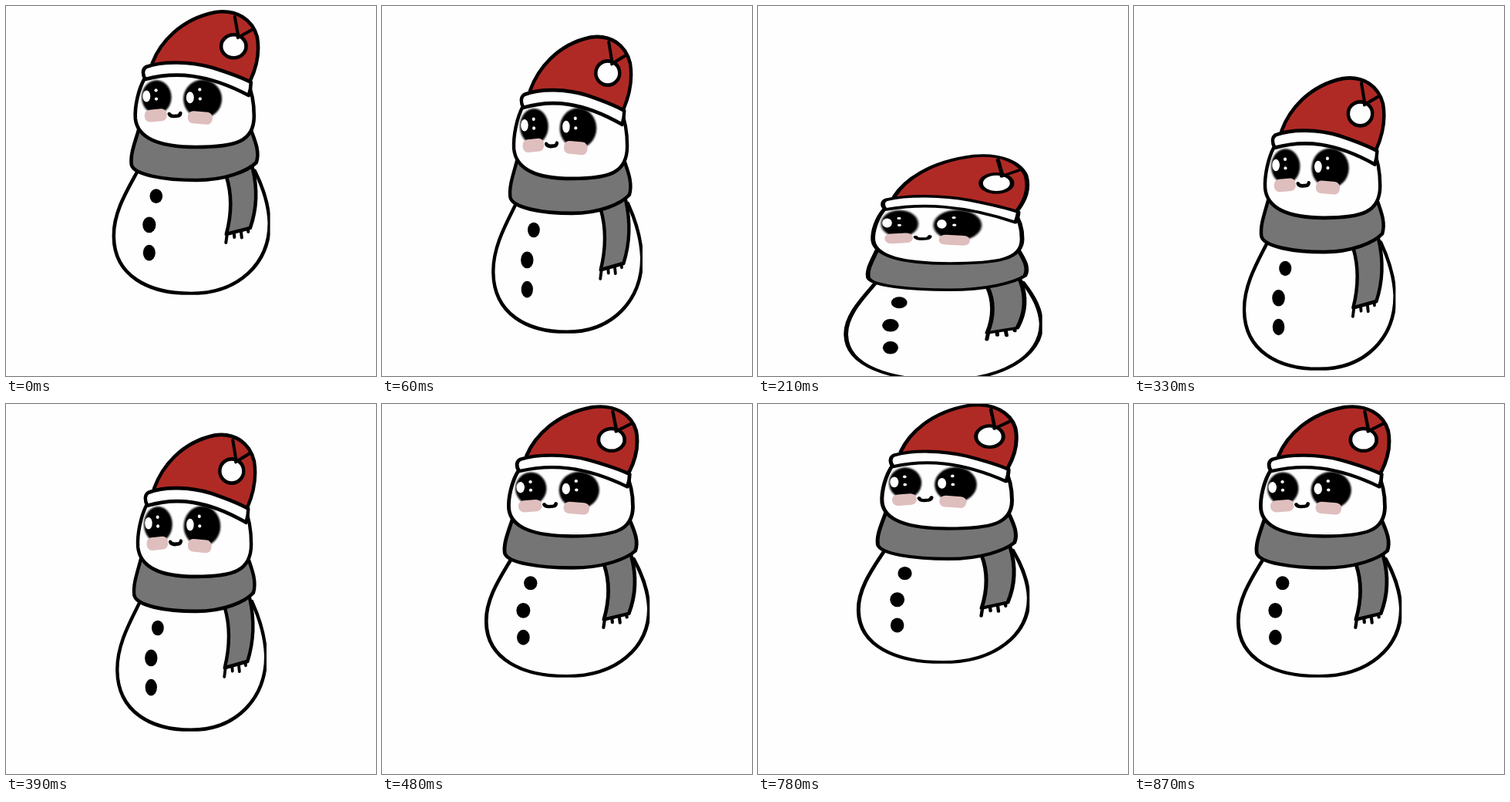
Write an HTML page that moves like this. It is 480 by 480 pixels and loops after 0.9 s.

```html
<!DOCTYPE html>
<html lang="en">
<head>
<meta charset="utf-8">
<title>Bouncing snowman</title>
<style>
  html, body { margin: 0; width: 100%; height: 100%; overflow: hidden; background: #fefefe; }
  svg { display: block; width: 100vw; height: 100vh; }
  .ink { stroke: #000; stroke-width: 4.6; stroke-linecap: round; stroke-linejoin: round; }
</style>
</head>
<body>
<svg viewBox="0 0 480 480">
  <defs>
    <filter id="soft" x="-20%" y="-20%" width="140%" height="140%">
      <feGaussianBlur stdDeviation="1.1"/>
    </filter>
    <clipPath id="edge"><rect x="137.5" y="4" width="205.3" height="370.7"/></clipPath>
  </defs>
  <g id="snowman">
    <g clip-path="url(#edge)">
      <g class="ink" fill="#fefefe">
        <path d="M171 214C158 238 139 268 140 300C141 350 185 373 240 373C302 373 342 334 342 281C341 258 335 238 323 214"/>
        <g fill="#757575">
          <path d="M286 221C293 243 293 270 286 296L317 288C325 265 327 238 320 210"/>
          <path fill="none" stroke-width="4" d="M287 296L285.5 307M296 294L296.5 300M305 292L306 300.5M314 289L314.5 293"/>
          <path d="M173 158C168 176 161 192 163 206C166 219 205 226 247 226C285 226 314 214 325 203C330 188 322 172 317 158Z"/>
        </g>
        <path d="M180 94C172 108 167 130 168 146C171 174 205 183 247 183C298 183 322 176 322 143C322 125 319 110 313 98"/>
        <path fill="#b02a25" d="M190 74C200 48 226 17 272 8C300 4 320 18 326 40C330 62 325 80 317 97"/>
        <path d="M182 79C204 71 240 72 268 80C287 86 305 92 318 99C318 105 317 110 315 116C298 107 272 95 242 91C220 88 200 90 181 95C177 89 177 82 182 79Z"/>
        <ellipse cx="295.5" cy="52.3" rx="16.2" ry="15"/>
        <path fill="none" stroke-width="4.2" d="M297 14L301.5 39M319 31L301 41"/>
      </g>
      <g filter="url(#soft)">
        <ellipse cx="195.5" cy="118.3" rx="19.3" ry="22"/>
        <ellipse cx="255.3" cy="120.6" rx="25" ry="25"/>
      </g>
      <g fill="#fff">
        <ellipse cx="182.5" cy="117" rx="5" ry="7.5"/>
        <ellipse cx="239" cy="118.8" rx="5" ry="7.5"/>
        <circle cx="194.8" cy="109.4" r="2.1"/>
        <circle cx="195.2" cy="120.6" r="2.1"/>
        <circle cx="251.5" cy="108.4" r="2.1"/>
        <circle cx="252" cy="120.4" r="2.1"/>
      </g>
      <g fill="#dfbebe">
        <rect x="180" y="134" width="29" height="16" rx="7" transform="rotate(-5 194 142)"/>
        <rect x="236" y="137" width="32" height="16" rx="7" transform="rotate(5 252 145)"/>
      </g>
      <path class="ink" fill="none" d="M212 140Q213 143 218 143L223 142.5Q226 142 226.5 139"/>
      <ellipse cx="195" cy="246.6" rx="8.3" ry="9.4"/>
      <ellipse cx="186" cy="283.8" rx="8.6" ry="10.4"/>
      <ellipse cx="186" cy="320.2" rx="8" ry="10.4"/>
    </g>
  </g>
</svg>
<script>
  const snowman = document.getElementById("snowman");
  const STEP = 30, STEPS = 30;
  const BASE = { x: 240.5, y: 190.5, w: 205, h: 369 };
  const AREA = BASE.w * BASE.h;

  // Rise from squash to apex: [step, centre y, slope, height, slope]
  const keys = [
    [0, 340, -10, 294, 27],
    [3, 282.5, -25.5, 381, 10],
    [7, 190.5, -16, 369, -13],
    [8, 178.6, -8, 353, -11],
    [12, 168, -0.5, 336, -1],
    [14, 167.6, 0, 335, 0]
  ];

  function hermite(a, b, col, k) {
    const span = b[0] - a[0], u = (k - a[0]) / span, v = 1 - u;
    return v * v * (1 + 2 * u) * a[col] + u * u * (3 - 2 * u) * b[col]
      + span * u * v * (v * a[col + 1] - u * b[col + 1]);
  }

  function render(ms) {
    const s = Math.floor(ms / STEP) % STEPS;
    const d = Math.abs(s - 7.5);
    const k = Math.min(d, STEPS - d) - 0.5;
    const i = Math.max(1, keys.findIndex(key => key[0] >= k));
    const y = hermite(keys[i - 1], keys[i], 1, k);
    const h = hermite(keys[i - 1], keys[i], 3, k);
    const w = AREA / h;   // squash and stretch keep the area
    snowman.setAttribute("transform",
      `translate(240.3 ${y}) scale(${w / BASE.w} ${h / BASE.h}) translate(${-BASE.x} ${-BASE.y})`);
  }

  const start = performance.now();
  function tick() {
    render(performance.now() - start);
    requestAnimationFrame(tick);
  }
  render(0);
  requestAnimationFrame(tick);
</script>
</body>
</html>
```
